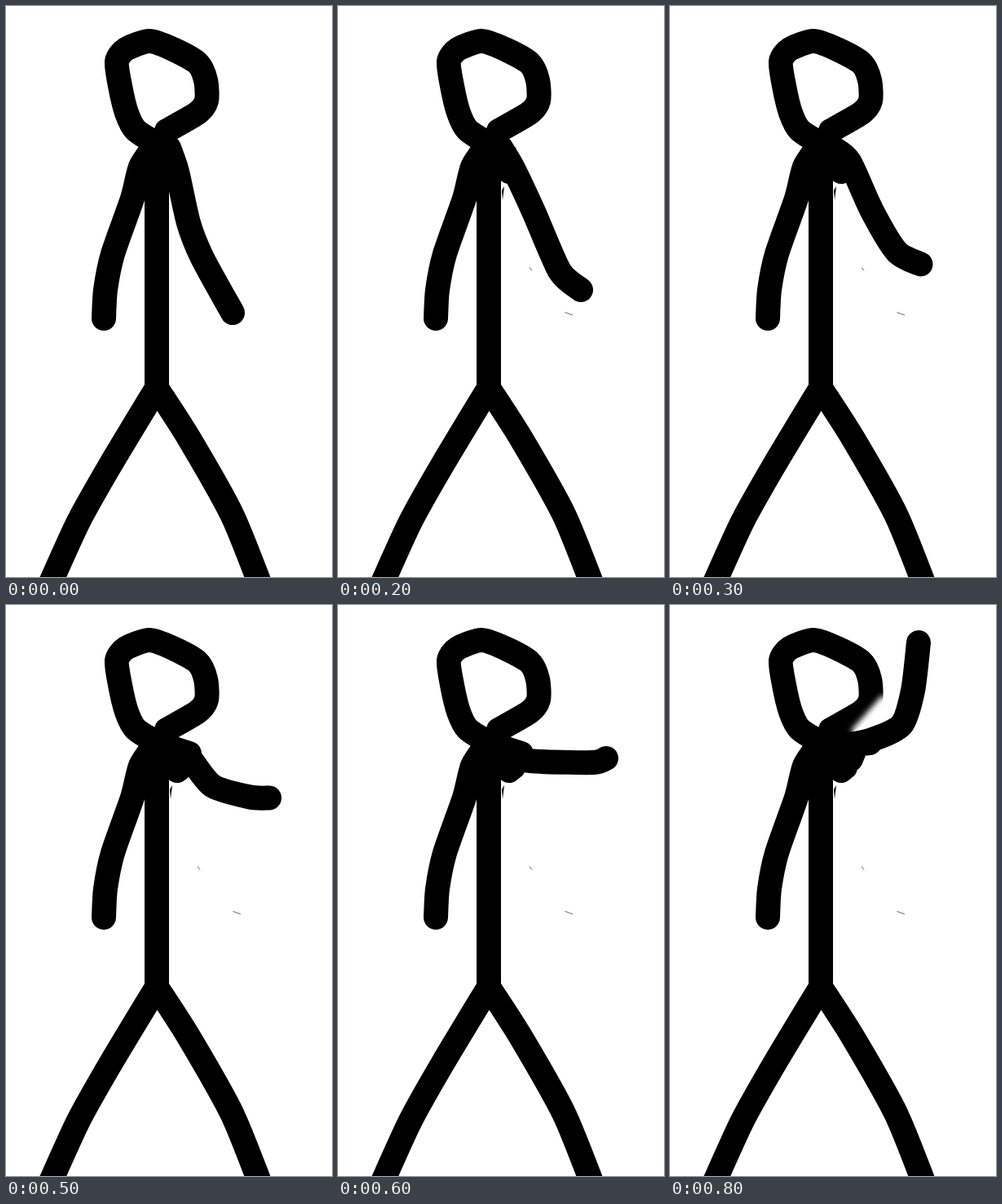
Animation of 400 by 700 pixels, one loop 0.9 s. Source, as an HTML page:

```html
<!DOCTYPE html>
<html lang="en">
<head>
<meta charset="utf-8">
<title>Waving stick figure</title>
<style>
html, body { margin: 0; width: 100%; height: 100%; overflow: hidden; background: #fff; }
svg { display: block; width: 100vw; height: 100vh; }
.limb { fill: none; stroke: #000; stroke-width: 30; stroke-linecap: round; stroke-linejoin: round; }
</style>
</head>
<body>
<svg viewBox="0 0 400 700">
  <defs>
    <filter id="soft" x="-30%" y="-30%" width="160%" height="160%"><feGaussianBlur stdDeviation="3.5"/></filter>
  </defs>
  <path id="head" class="limb"/>
  <path id="smudge" d="M260 111L222 154L240 172L282 122Z" fill="#fff" filter="url(#soft)"/>
  <path id="leftArm" class="limb"/>
  <path id="leftLeg" class="limb"/>
  <path id="rightLeg" class="limb"/>
  <path d="M170 168H200V472H170Z"/>
  <path id="stubs" class="limb"/>
  <path id="arm" class="limb"/>
  <circle id="hand" cx="325" cy="124" r="17"/>
  <g id="specks" fill="none" stroke="#000" stroke-width=".6">
    <path d="M201 226L204 221L202 238Z" fill="#000" stroke="none"/>
    <path d="M215 173L219 174M235 320.500L238 324.500M278.500 375.500L288 379"/>
  </g>
</svg>
<script>
const STEP = 100, COUNT = 9;
const $ = id => document.getElementById(id);
const points = text => text.split(' ').map(p => p.split(',').map(Number));

// Slightly tight smooth curve through every point
function curve(pts) {
  const at = i => pts[Math.max(0, Math.min(pts.length - 1, i))];
  const handle = (p, from, to) => p.map((v, k) => v + (to[k] - from[k]) / 8);
  let d = 'M' + pts[0];
  for (let i = 1; i < pts.length; i++) {
    const a = at(i - 1), b = at(i);
    d += `C${handle(a, at(i - 2), b)} ${handle(b, at(i + 1), a)} ${b}`;
  }
  return d;
}

const body = {
  head: '197,153 235,131 246,116 245,91 235,70 205,53 176,43 147,53 136,68 140,98 148,131 159,152 182,167',
  leftArm: '182,172 165,197 155,236 131,304 122,348 120,383',
  leftLeg: '184,470 129,561 89,632 53,711',
  rightLeg: '186,470 224,529 277,623 311,707'
};
for (const id in body) $(id).setAttribute('d', curve(points(body[id])));

// Raised arm: shoulder to hand, from hanging to waving
const shoulder = [200, 174];
const poses = [
  '210,203 224,266 241,309 278,376',
  '215,199 240,252 272,325 298,348',
  '225,182 256,251 285,278 317,285',
  '222,189 250,192 314,193 329,188',
  '245,169 287,160 312,147 325,124',
  '245,166 284,147 298,105 305,46'
].map(text => [shoulder, ...points(text)]);

// Two steps per pose until the arm is level, then one
function armAt(step) {
  const k = step < 6 ? step / 2 : step - 3;
  const from = poses[Math.floor(k)], to = poses[Math.ceil(k)];
  return from.map((p, i) => p.map((v, c) => v + (to[i][c] - v) * (k % 1)));
}

const show = (id, on) => $(id).setAttribute('visibility', on ? 'visible' : 'hidden');

function draw(now) {
  const step = Math.floor(now / STEP) % COUNT;
  // Each earlier arm leaves its stub at the shoulder
  let stubs = '';
  for (let s = 0; s < step; s++) stubs += curve(armAt(s).slice(0, 2));
  $('stubs').setAttribute('d', stubs);
  $('arm').setAttribute('d', curve(armAt(step)));
  show('specks', step > 0);
  show('hand', step === 7);
  show('smudge', step === 8);
}

const start = performance.now();
function tick() {
  draw(performance.now() - start);
  requestAnimationFrame(tick);
}
tick();
</script>
</body>
</html>
```
